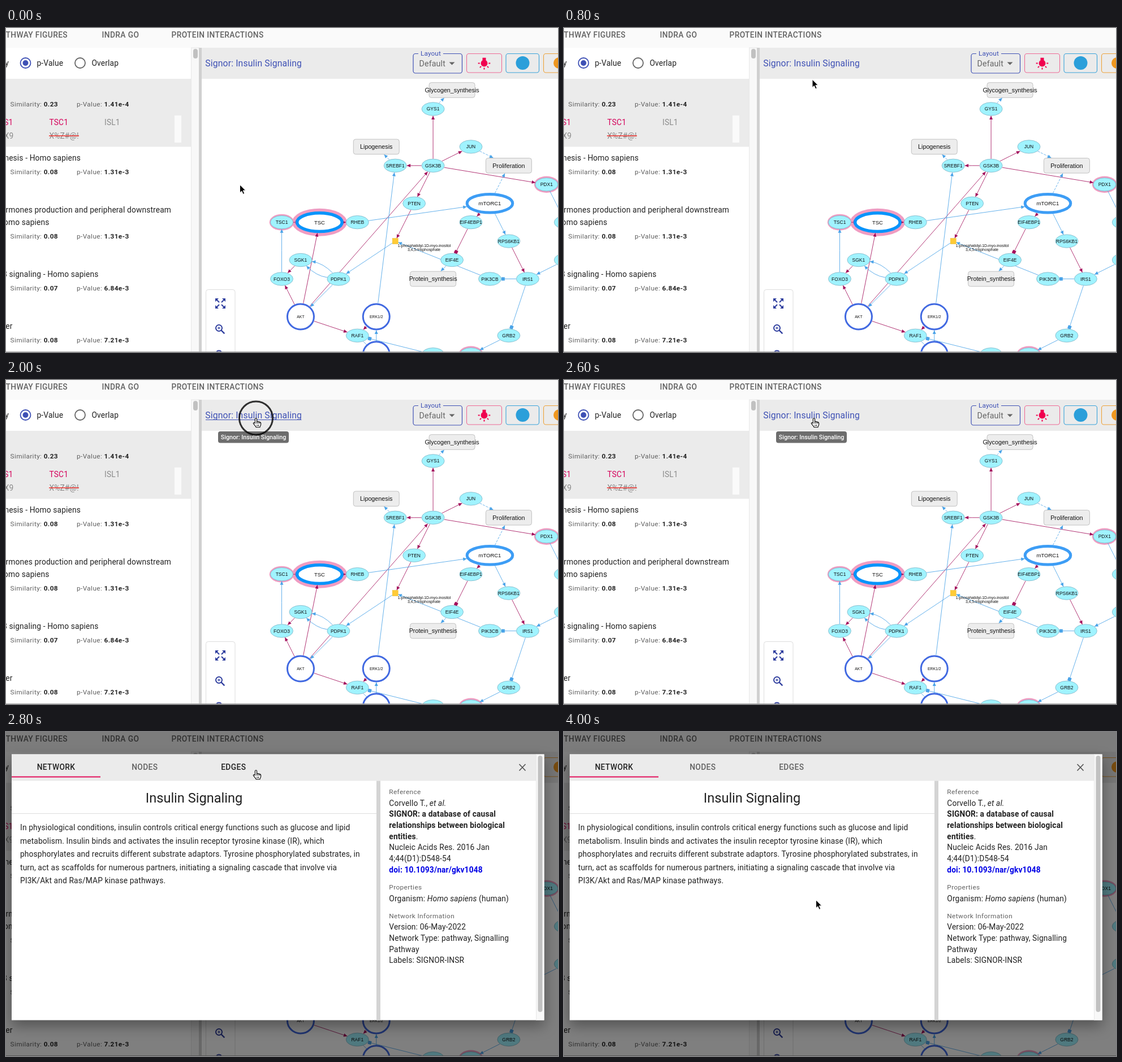
Animation of 976x574 px, one loop 5.77 s. Source, as an HTML page:

```html
<!DOCTYPE html>
<html lang="en">
<head>
<meta charset="utf-8">
<title>Pathway details</title>
<style>
html, body { margin: 0; width: 100%; height: 100%; overflow: hidden; background: #fafafa; }
svg { display: block; width: 976px; height: 574px; }
text { font: 13.75px Roboto, sans-serif; letter-spacing: .01071em; fill: #212121; white-space: pre; }
.end { text-anchor: end; }
.mid { text-anchor: middle; }
.tab { font-weight: 500; letter-spacing: .02857em; fill: #616161; }
.small { font-size: 11.8px; letter-spacing: .0333em; fill: #616161; }
.small tspan { font-weight: 700; fill: #212121; }
.hit { fill: #d5005a; }
.miss { fill: #8a8a8a; }
.title { font-size: 15.72px; letter-spacing: .00938em; fill: #3f51b5; }
.heading { font-size: 23.57px; letter-spacing: 0; }
.tip { font-size: 10.7px; font-weight: 500; letter-spacing: 0; fill: #fff; }
.b { font-weight: 700; }
.i { font-style: italic; }
.doi { font-weight: 700; fill: #0000e6; }
.graph { stroke-width: .85; }
.graph text { font: 8.5px "Liberation Sans", sans-serif; letter-spacing: 0; fill: #111; text-anchor: middle; }
.graph .wide { font-size: 10.75px; }
.graph .big { font-size: 9.5px; }
.graph .tiny { font-size: 6.8px; }
#sheet { filter: drop-shadow(0 10px 12px rgba(0,0,0,.35)); }
#tooltip { transform-origin: 437.5px 91px; }
</style>
</head>
<body>
<svg viewBox="0 0 976 574">
  <rect width="976" height="574" fill="#fafafa"/>
  <text class="tab end" x="109" y="16.500">PATHWAY FIGURES</text>
  <text class="tab" x="169.500" y="16.500">INDRA GO</text>
  <text class="tab" x="292.500" y="16.500">PROTEIN INTERACTIONS</text>

  <rect y="35" width="328" height="539" fill="#fff"/>
  <rect y="90" width="327" height="120.500" fill="#ebebeb"/>
  <rect x="298" y="155" width="12" height="48" fill="#fafafa"/>
  <g id="list">
    <text class="end" x="5" y="67">Similarity</text>
    <g fill="none" stroke-width="1.800">
      <circle cx="34.500" cy="62" r="9" stroke="#3f51b5"/>
      <circle cx="131" cy="62" r="9" stroke="#666"/>
    </g>
    <circle cx="34.500" cy="62" r="5" fill="#3f51b5"/>
    <text x="54.500" y="67">p-Value</text>
    <text x="151.500" y="67">Overlap</text>
    <text class="hit end" x="12.500" y="172">IRS1</text>
    <text class="hit" x="76.500" y="172">TSC1</text>
    <text class="miss" x="174" y="172">ISL1</text>
    <text class="miss end" x="13.500" y="195.500">SOX9</text>
    <text class="miss" x="76.500" y="195.500">X%Z#@!</text>
    <path d="M76 191H129" stroke="#f0302c" stroke-width="1.600"/>
    <text class="end" x="132" y="235">genesis - Homo sapiens</text>
    <text class="end" x="292" y="327">hormones production and peripheral downstream</text>
    <text class="end" x="76.500" y="348.500">Homo sapiens</text>
    <text class="end" x="163.500" y="441">B signaling - Homo sapiens</text>
    <text class="end" x="11.500" y="533">Cancer</text>
  </g>
  <rect x="327.500" y="35" width="14" height="539" fill="#f8f8f8" stroke="#e8e8e8"/>
  <rect x="331" y="37" width="8" height="17" rx="4" fill="#c1c1c1"/>
  <rect x="341" y="35" width="5" height="539" fill="#d0d0d0"/>

  <rect x="346" y="35" width="630" height="55" fill="#ebebeb"/>
  <rect x="346" y="90" width="630" height="484" fill="#fff"/>
  <text class="title" x="352.300" y="68">Signor: Insulin Signaling</text>
  <path id="underline" d="M353 70.500H522.500" stroke="#3f51b5" stroke-width="1.200"/>
  <rect x="720" y="45.500" width="86.500" height="34.500" rx="4" fill="none" stroke="#3f51b5" stroke-width="1.200"/>
  <rect x="729" y="43" width="44" height="5" fill="#ebebeb"/>
  <text class="small" x="733" y="49" style="fill:#3f51b5;letter-spacing:.00938em">Layout</text>
  <text x="730.500" y="67.500" style="font-size:14.2px;fill:#666">Default</text>
  <path d="M783.500 60.500h10l-5 5z" fill="#666"/>
  <g fill="none" stroke-width="1.100">
    <rect x="814.500" y="45.500" width="62" height="33.500" rx="4" stroke="#ee6b96"/>
    <rect x="884" y="45.500" width="58.500" height="33.500" rx="4" stroke="#3aa3da"/>
    <rect x="950.500" y="45.500" width="60" height="33.500" rx="4" stroke="#eda23a"/>
  </g>
  <g fill="#f0004f" stroke="#f0004f" stroke-width="2">
    <circle cx="845.500" cy="62.500" r="5.900" stroke="none"/>
    <path d="M842.500 52.700h6v6h-6z" stroke="none"/>
    <path d="M834.700 62.500h3M853.300 62.500h3M845.500 70.400v3M840.100 67.900l-2.200 2.200M850.900 67.900l2.200 2.200"/>
  </g>
  <circle cx="913.500" cy="62" r="12" fill="#2b9fda"/>
  <circle cx="978" cy="62" r="10" fill="#ee9720"/>

  <g class="graph" id="graph"></g>

  <rect x="353.500" y="463.500" width="51.500" height="130" rx="4" fill="#fff" stroke="#ddd"/>
  <path d="M370 479h6l-6 6zM388 479v6l-6-6zM388 497h-6l6-6zM370 497v-6l6 6z" fill="#303f9f"/>
  <g fill="none" stroke="#303f9f" stroke-width="2">
    <path d="M372 481l5 5M386 481l-5 5M386 495l-5-5M372 495l5-5"/>
    <circle cx="376.500" cy="531.500" r="5.500"/>
    <path d="M380.500 535.500l5.800 5.800" stroke-width="2.400"/>
    <path d="M374 531.500h5M376.500 529v5" stroke-width="1.200"/>
    <circle cx="376.500" cy="577" r="5.500"/>
  </g>
  <path d="M0 573.500H976" stroke="#aaa"/>

  <rect id="backdrop" width="976" height="574"/>
  <g id="dialog">
    <rect id="sheet" x="10" y="39.500" width="941.500" height="471" fill="#fff"/>
    <rect x="10" y="39.500" width="928" height="47" fill="#ebebeb"/>
    <rect x="937" y="39.500" width="14.500" height="471" fill="#f8f8f8"/>
    <path d="M937.500 39.500V510.500" stroke="#e8e8e8"/>
    <rect x="940.500" y="42" width="8" height="454" rx="4" fill="#c1c1c1"/>
    <rect x="655" y="86.500" width="7" height="424" fill="#d4d4d4"/>
    <path d="M10 144.500H655" stroke="#ddd"/>
    <rect x="10" y="78.500" width="157" height="2" fill="#e3125c"/>
    <text class="tab mid" x="88.500" y="67.300" style="fill:#212121">NETWORK</text>
    <text class="tab mid" x="245.300" y="67.300">NODES</text>
    <text class="tab mid" id="edgesTab" x="402.300" y="67.300">EDGES</text>
    <path d="M907.500 57l11 11.500M918.500 57l-11 11.500" stroke="#555" stroke-width="1.700"/>
    <text class="heading mid" x="332.500" y="124.500">Insulin Signaling</text>
    <g id="summary"></g>
    <g id="facts"></g>
  </g>

  <g id="tooltip">
    <rect x="375" y="91" width="125" height="20.500" rx="4" fill="#616161" fill-opacity=".92"/>
    <text class="tip mid" x="437.500" y="105">Signor: Insulin Signaling</text>
  </g>
  <circle id="ring" cx="442" cy="67.500" r="29.500" fill="none" stroke="#000" stroke-opacity=".8" stroke-width="3"/>
  <g id="cursor">
    <path id="arrow" d="M0-.8V13.400L3.300 10.400L5.700 15.900L8.200 14.800L5.800 9.400H10.200Z" fill="#000" stroke="#fff" stroke-width="1" stroke-linejoin="round"/>
    <path id="hand" d="M-1.600 8V1Q-1.500-.6 0-.6T1.500 1V5.500Q2.500 4.400 4 5.700Q5.500 4.900 6.500 6.400Q8.600 6 8.600 8.500V10.500Q8.400 12.500 7 14.500V15.500H.2Q-.5 13.500-2.500 11.500L-4.600 8.800Q-5 7.300-3.500 7.200Q-2.600 7.200-1.600 8.500ZM1.500 5.500V9M4 6V9M6.500 6.500V9M2 11V13.500M4.500 11V13.500" fill="#fff" stroke="#000" stroke-width="1.100" stroke-linejoin="round"/>
  </g>
</svg>
<script>
const $ = id => document.getElementById(id);
const add = (id, markup) => $(id).insertAdjacentHTML('beforeend', markup);

// Result list scores
[[139, .23, '1.41e-4'], [259, .08, '1.31e-3'], [373, .08, '1.31e-3'], [465, .07, '6.84e-3'], [557, .08, '7.21e-3']]
  .forEach(([y, similarity, p]) => add('list',
    `<text class="small" x="7.500" y="${y}">Similarity: <tspan>${similarity.toFixed(2)}</tspan></text>
     <text class="small" x="125" y="${y}">p-Value: <tspan>${p}</tspan></text>`));

// Dialog copy
['In physiological conditions, insulin controls critical energy functions such as glucose and lipid',
 'metabolism. Insulin binds and activates the insulin receptor tyrosine kinase (IR), which',
 'phosphorylates and recruits different substrate adaptors. Tyrosine phosphorylated substrates, in',
 'turn, act as scaffolds for numerous partners, initiating a signaling cascade that involve via',
 'PI3K/Akt and Ras/MAP kinase pathways.'
].forEach((line, i) => add('summary', `<text x="25" y="${174 + 23.5 * i}">${line}</text>`));

[[110, 'small', ['Reference']],
 [130.7, '', ['Corvello T., <tspan class="i">et al.</tspan>']],
 [150.3, 'b', ['SIGNOR: a database of causal', 'relationships between biological',
   'entities<tspan style="font-weight:400">.</tspan>']],
 [209.2, '', ['Nucleic Acids Res. 2016 Jan', '4;44(D1):D548-54']],
 [248.5, 'doi', ['doi: 10.1093/nar/gkv1048']],
 [279, 'small', ['Properties']],
 [299.5, '', ['Organism: <tspan class="i">Homo sapiens</tspan> (human)']],
 [330, 'small', ['Network Information']],
 [350.3, '', ['Version: 06-May-2022', 'Network Type: pathway, Signalling', 'Pathway', 'Labels: SIGNOR-INSR']]
].forEach(([y, cls, lines]) => lines.forEach((line, i) =>
  add('facts', `<text class="${cls}" x="677.300" y="${y + 19.67 * i}">${line}</text>`)));

// Graph: nodes sit on a regular lattice given as column, row
const STEP = 33.45, X0 = 487.5, Y0 = 110;
const nodes = {};
const shapes = {
  gene: { rx: 20, ry: 11.7, fill: '#a0f3ff', stroke: '#7fb4c4', w: .8, cls: '' },
  process: { rx: 40.5, ry: 13.3, fill: '#ededed', stroke: '#b5b5b5', w: .8, cls: 'wide', box: true },
  family: { rx: 23.5, ry: 22.5, fill: '#fff', stroke: '#4169e1', w: 3, cls: 'tiny' },
  mTORC1: { rx: 40.3, ry: 16.3, fill: '#fff', stroke: '#3d9df5', w: 5, cls: 'big' },
  TSC: { rx: 39.8, ry: 16.3, fill: '#fff', stroke: '#0894fb', w: 5.5, cls: 'big' },
  chemical: { rx: 5, ry: 5, fill: '#ffcb36', stroke: '#e8b52a', w: .5, cls: '', box: true }
};
const place = (kind, list) => list.split(' ').forEach(item => {
  const [name, col, row] = item.split(',');
  nodes[name] = { name, x: X0 + col * STEP, y: Y0 + row * STEP, ...shapes[kind] };
});
place('gene', 'GYS1,8,1 JUN,10,3 SREBF1,6,4 GSK3B,8,4 PDX1,14,5 PTEN,7,6 TSC1,0,7 RHEB,4,7 EIF4EBP1,10,7 ' +
  'RPS6KB1,12,8 SGK1,1,9 EIF4E,9,9 FOXO3,0,10 PDPK1,3,10 PIK3CB,11,10 IRS1,13,10 RAF1,4,13 GRB2,12,13 ' +
  '_right,15,7 _right2,15,9 _low,8,14 _low2,10,14');
place('process', 'Glycogen_synthesis,9,0 Lipogenesis,5,3 Proliferation,12,4 Protein_synthesis,8,10');
place('family', 'AKT,1,12 ERK1/2,5,12 _kinase,5,14');
place('mTORC1', 'mTORC1,11,6');
place('TSC', 'TSC,2,7');
place('chemical', '_pip3,6,8');

function rim(node, toX, toY) {
  const dx = toX - node.x, dy = toY - node.y;
  const u = Math.abs(dx) / (node.rx + node.w / 2), v = Math.abs(dy) / (node.ry + node.w / 2);
  const k = 1 / (node.box ? Math.max(u, v) : Math.hypot(u, v));
  return [node.x + dx * k, node.y + dy * k];
}

function edge(from, to, color, head = 'arrow', bend = 0) {
  const a = nodes[from], b = nodes[to];
  const dx = b.x - a.x, dy = b.y - a.y, len = Math.hypot(dx, dy);
  const cx = (a.x + b.x) / 2 - dy / len * bend, cy = (a.y + b.y) / 2 + dx / len * bend;
  const [x1, y1] = rim(a, cx, cy), [x2, y2] = rim(b, cx, cy);
  const angle = Math.atan2(y2 - cy, x2 - cx) * 180 / Math.PI;
  const tips = { arrow: 'M0 0L-6.500 -3V3Z', dash: 'M0 0L-6.500 -3V3Z', square: 'M0 -3H-6V3H0Z', none: '' };
  add('graph', `<path d="M${x1} ${y1}Q${cx} ${cy} ${x2} ${y2}" fill="none" stroke="${color}"
      ${head === 'dash' ? 'stroke-dasharray="4 2"' : ''}/>
    <path d="${tips[head]}" fill="${color}" transform="translate(${x2} ${y2}) rotate(${angle})"/>`);
}

const halo = (name, rx, ry) => add('graph',
  `<ellipse cx="${nodes[name].x}" cy="${nodes[name].y}" rx="${rx}" ry="${ry}" fill="#f09cc2"/>`);
halo('TSC1', 21.7, 14.5);
halo('TSC', 48.5, 24.5);
halo('PDX1', 22, 14.7);
halo('_low2', 22, 14.7);

const WINE = '#a3105c', BLUE = '#4aa3e8';
const edges = (color, head, list) => list.split(' ').forEach(pair => edge(...pair.split('>'), color, head));
edges(WINE, 'arrow', 'GSK3B>GYS1 GSK3B>SREBF1 GSK3B>JUN GSK3B>PDX1 GSK3B>PTEN PTEN>_pip3 TSC>RHEB ' +
  'mTORC1>EIF4EBP1 RPS6KB1>IRS1 SGK1>FOXO3 AKT>FOXO3 AKT>TSC AKT>GSK3B AKT>RAF1 ERK1/2>RAF1');
edges(WINE, 'square', 'EIF4EBP1>EIF4E TSC1>TSC');
edges(BLUE, 'dash', 'GYS1>Glycogen_synthesis SREBF1>Lipogenesis JUN>Proliferation mTORC1>Proliferation');
edges(BLUE, 'arrow', 'RHEB>mTORC1 mTORC1>RPS6KB1 ERK1/2>SREBF1 _pip3>PDPK1 PIK3CB>_pip3 EIF4E>Protein_synthesis ' +
  'PDPK1>AKT FOXO3>TSC1 GRB2>_low2 _right2>IRS1 RAF1>_kinase _kinase>ERK1/2');
edges(BLUE, 'square', 'IRS1>PIK3CB IRS1>GRB2 _low>RAF1');
edges(BLUE, 'none', 'PDX1>_right');
edge('PDPK1', 'SGK1', BLUE, 'arrow', 13);
edge('PDPK1', 'SGK1', BLUE, 'arrow', -13);

for (const n of Object.values(nodes)) {
  const paint = `fill="${n.fill}" stroke="${n.stroke}" stroke-width="${n.w}"`;
  add('graph', n.box
    ? `<rect x="${n.x - n.rx}" y="${n.y - n.ry}" width="${2 * n.rx}" height="${2 * n.ry}" rx="${n.rx > 9 ? 4 : 0}" ${paint}/>`
    : `<ellipse cx="${n.x}" cy="${n.y}" rx="${n.rx}" ry="${n.ry}" ${paint}/>`);
  if (n.name[0] !== '_') {
    const drop = { wide: 3.7, tiny: 2.4, big: 3.4 }[n.cls] || 3;
    add('graph', `<text class="${n.cls}" x="${n.x}" y="${n.y + drop}">${n.name}</text>`);
  }
}
add('graph', `<text class="tiny" x="739.500" y="388">1-phosphatidyl-1D-myo-inositol</text>
  <text class="tiny" x="739" y="394.700">3,4,5-trisphosphate</text>`);

// Pointer hot spot: time, x, y; each pose holds until the next
const LOOP = 5770;
const path = [
  [0, 413.5, 278.5], [100, 414, 276], [200, 416, 268], [300, 418, 254], [400, 421, 233.5],
  [500, 425, 193], [600, 430, 148], [700, 435, 115], [800, 439, 92], [900, 441, 79],
  [1000, 442, 70], [1100, 442, 68.3], [3000, 442, 73], [3100, 443, 94], [3200, 444, 134],
  [3300, 445, 182], [3400, 445, 226], [3500, 445.5, 260], [3600, 445.5, 274], [3700, 445.5, 284],
  [3800, 445.5, 291], [3900, 445.5, 296], [4000, 445.5, 298.5]
];
const show = (id, amount) => $(id).style.opacity = Number(amount);

function render(t) {
  const within = (from, to) => t >= from && t < to;
  const [, x, y] = path.findLast(p => p[0] <= t);
  $('cursor').setAttribute('transform', `translate(${x} ${y})`);
  const pointing = within(1000, 3100);
  show('hand', pointing);
  show('arrow', !pointing);
  show('underline', within(1000, 2600));
  show('ring', within(2000, 2200));
  const opening = within(2700, 2800);
  const fade = opening ? .88 : Number(t >= 2800);
  show('backdrop', fade / 2);
  show('dialog', fade);
  show('tooltip', opening ? .13 : within(1100, 2700));
  $('tooltip').style.transform = opening ? 'scale(.86, .74)' : '';
  $('edgesTab').style.fill = within(2700, 3100) ? '#212121' : '';
}

const start = performance.now();
(function tick() {
  render((performance.now() - start) % LOOP);
  requestAnimationFrame(tick);
})();
</script>
</body>
</html>
```
